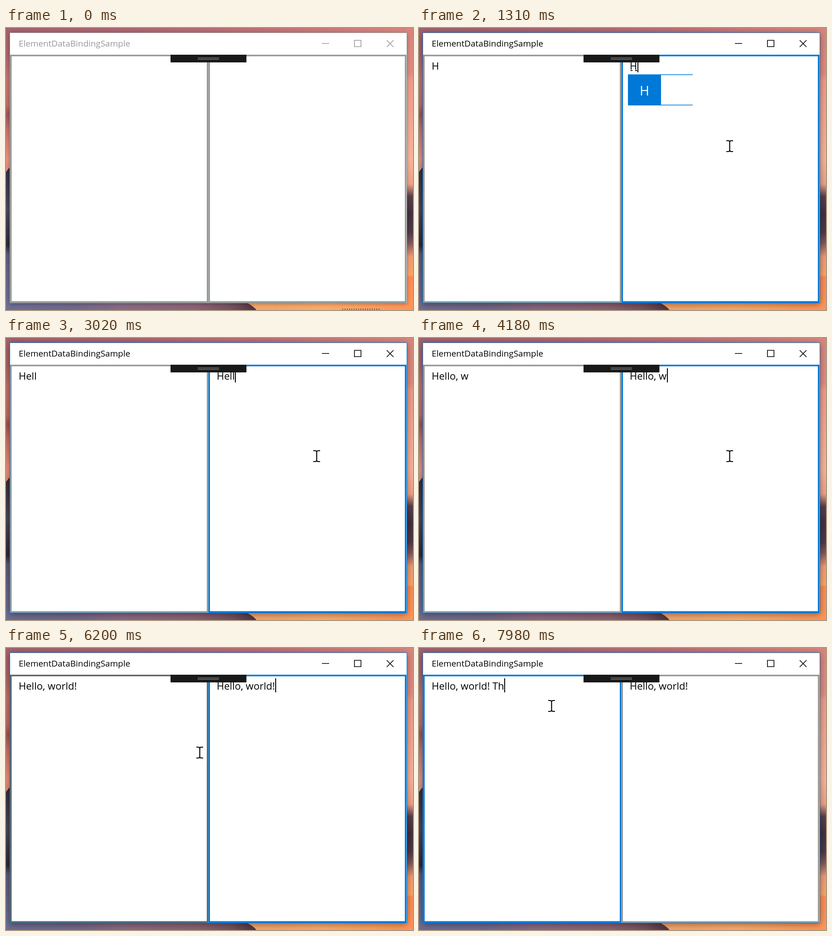
Recreate the animation shown at these times as an HTML page with a canvas. Size 898 by 623 pixels, loop 8000 ms.

```html
<!DOCTYPE html>
<html lang="en">
<head>
<meta charset="utf-8">
<title>Element data binding</title>
<style>
  html, body { margin: 0; width: 100%; height: 100%; overflow: hidden; }
  canvas { display: block; }
</style>
</head>
<body>
<canvas id="stage" width="898" height="623"></canvas>
<script>
const W = 898, H = 623, LOOP = 8000;
const g = document.getElementById('stage').getContext('2d');
const FACE = '"Open Sans", "Noto Sans", sans-serif';
const BLUE = '#0078d7', IDLE = '#969a98', HOVER = '#606664';

const PHRASE = 'Hello, world! Th';
const KEYS = [2640, 2790, 2870, 3020, 3170, 3720, 3950, 4180,
              4260, 4410, 4560, 4730, 5450, 7430, 7810, 7980];
const FOCUS_RIGHT = 530, FOCUS_LEFT = 6820;

function rect(x, y, w, h, color) {
  g.fillStyle = color;
  g.fillRect(x, y, w, h);
}

function label(text, x, y, size, color) {
  g.font = `${size}px ${FACE}`;
  g.fillStyle = color;
  g.fillText(text, x, y);
}

function stroke(path, color, width) {
  g.strokeStyle = color;
  g.lineWidth = width;
  g.stroke(new Path2D(path));
}

function shape(path, color) {
  g.fillStyle = color;
  g.fill(new Path2D(path));
}

function frame(x, y, w, h, color) {
  const line = 3.5;
  g.strokeStyle = color;
  g.lineWidth = line;
  g.strokeRect(x + line / 2, y + line / 2, w - line, h - line);
}

// Fills a strip with a gradient along its longer side; stops are "position color".
function strip(x, y, w, h, stops) {
  const wide = w > h, len = wide ? W : H;
  const fill = g.createLinearGradient(0, 0, wide ? W : 0, wide ? 0 : H);
  for (const stop of stops.split(', ')) {
    const [at, color] = stop.split(' ');
    fill.addColorStop(at / len, color);
  }
  rect(x, y, w, h, fill);
}

function wallpaper() {
  strip(0, 0, W, 300, '0 #a3616c, 300 #ae6570, 560 #bf6f75, 898 #d9857c');
  strip(0, 300, W, 323, '0 #6c6d95, 150 #70688c, 260 #8a6a85, 420 #8c6276, 500 #74505f, 550 #4e3340, 560 #f2a36c, 700 #fbab6c, 898 #ff9457');
  strip(0, 0, 10, 608, '0 #a3616c, 60 #a86368, 110 #c4726d, 170 #c06d69, 190 #9c5458, 225 #c8726a, 290 #ef917c, 307 #e08d7b, 310 #322c3c, 400 #4a465c, 480 #2d2838, 500 #5c5a7b, 608 #6c6d95');
  strip(883, 0, 15, 608, '0 #d9857c, 100 #e08c80, 115 #f09a88, 290 #fab498, 345 #f0a187, 372 #574048, 410 #43303f, 450 #4e3843, 475 #80575a, 505 #f09a70, 545 #fda468, 550 #ff8a52, 608 #ff9457');
  // slopes showing beside and under the window
  shape('M0 306H9L0 318Z', '#e08d7b');
  shape('M526 604Q543 612 553 623H590V604Z', '#f6a66c');
}

function windowChrome(active) {
  g.save();
  g.shadowColor = active ? 'rgba(0,0,0,.4)' : 'rgba(0,0,0,.3)';
  g.shadowBlur = active ? 14 : 8;
  g.shadowOffsetY = active ? 3 : 2;
  rect(8, 10, 877, 598, active ? BLUE : IDLE);
  g.restore();
  rect(9, 11, 875, 596, '#fff');
  const ink = active ? '#000' : IDLE;
  label('ElementDataBindingSample', 28, 41, 18.9, ink);
  stroke('M697 34.25H713M768.75 27.25H783.25V41.25H768.75ZM840 27L855 42M855 27L840 42', ink, 1.6);
}

function typed(text, x, hasCaret) {
  label(text, x, 92, 22, '#000');
  if (hasCaret) rect(Math.round(x + g.measureText(text).width + .4), 67, 2, 31, '#000');
}

function suggestion(t) {
  rect(467, 93, 4, 2, '#000');
  rect(477, 93, 4, 2, '#000');
  rect(461, 103, 73, 68, BLUE);
  rect(461, 102.5, 143, 1.5, BLUE);
  rect(461, 169.5, 143, 1.5, BLUE);
  if (t >= 1380) rect(602.5, 103, 1.5, 68, BLUE);
  label('H', 487, 149, 28.5, '#fff');
}

function progress(t, start, tick, ticks) {
  return Math.min(1, (Math.floor((t - start) / tick) + 1) / ticks);
}

function pointer(t) {
  if (t < 70) return null;
  if (t < 6120) {
    const rest = (1 - progress(t, 70, 76.6, 5)) ** 2;
    return [685 + 98 * rest, 261 + 380 * rest];
  }
  const p = progress(t, 6120, 77.7, 9);
  return [292 + 393 * (1 - p) ** 4.25, 261 - 133 * p];
}

function drawPointer([x, y]) {
  g.save();
  g.translate(Math.round(x), Math.round(y));
  stroke('M-7 -12H-3Q.5 -12 .5 -9Q.5 -12 4 -12H8M-7 12H-3Q.5 12 .5 9Q.5 12 4 12H8M.5 -10V10', '#000', 2.2);
  g.restore();
}

function draw(t) {
  const active = t >= FOCUS_RIGHT, onLeft = t >= FOCUS_LEFT;
  const composing = t >= 1310 && t < 1920;
  const count = composing ? 1 : KEYS.filter(k => k <= t).length;
  const at = pointer(t);
  const overLeft = at && at[0] < 447, overRight = at && !overLeft;
  const edge = (focused, hovered) => focused ? BLUE : hovered ? HOVER : IDLE;

  wallpaper();
  windowChrome(active);
  if (!active) for (let x = 742; x < 825; x += 5) rect(x, 620.5, 2, 1.5, '#222');

  frame(9, 59, 437.5, 548, edge(onLeft, overLeft));
  frame(446.5, 59, 437, 548, edge(active && !onLeft, overRight));
  typed(PHRASE.slice(0, count), 28, onLeft);
  typed(PHRASE.slice(0, Math.min(count, 13)), 465, active && !onLeft);
  if (composing) suggestion(t);

  rect(363, 59, 167.5, 17, '#181a19');
  rect(423, 65.5, 47, 1.3, '#858585');
  rect(423, 68.7, 47, 1.3, '#858585');
  if (at) drawPointer(at);
}

function tick() {
  draw(performance.now() % LOOP);
  requestAnimationFrame(tick);
}
tick();
</script>
</body>
</html>
```
